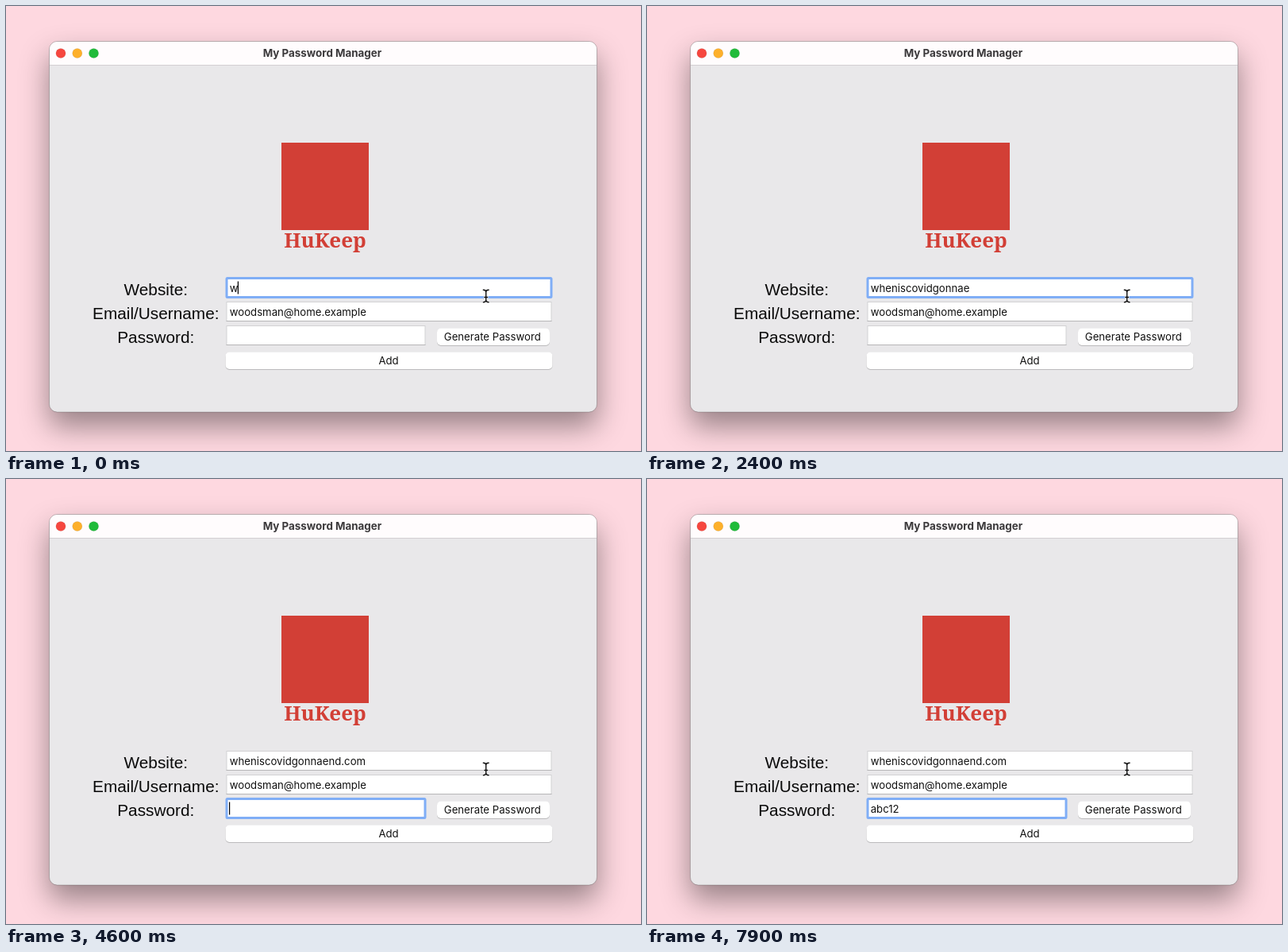
An HTML page for the animation above (8000 ms loop, 800 by 560 pixels).

```html
<!DOCTYPE html>
<html lang="en">
<head>
<meta charset="utf-8">
<title>My Password Manager</title>
<style>
  html, body { margin: 0; width: 100%; height: 100%; overflow: hidden; background: #fed8e0; }
  svg { display: block; width: 800px; height: 560px; }
  text { white-space: pre; }
  .ui { font: 13.2px Inter, sans-serif; fill: #111; }
  .label { font: 20.8px "Liberation Sans", Arial, sans-serif; fill: #0a0a0a; text-anchor: middle; }
  .title { font: 700 13.4px Inter, sans-serif; fill: #3b393b; text-anchor: middle; }
  .brand { font: 900 26px "Noto Serif", serif; fill: #d23f36; text-anchor: middle; }
  .mid { text-anchor: middle; }
</style>
</head>
<body>
<svg id="stage" viewBox="0 0 800 560" xmlns="http://www.w3.org/2000/svg">
  <defs>
    <filter id="shadow" filterUnits="userSpaceOnUse" x="-60" y="-60" width="920" height="700" color-interpolation-filters="sRGB">
      <feDropShadow dx="0" dy="18" stdDeviation="18" flood-color="#000" flood-opacity="0.4"/>
    </filter>
    <filter id="lift" x="-5%" y="-30%" width="110%" height="170%" color-interpolation-filters="sRGB">
      <feDropShadow dx="0" dy="0.7" stdDeviation="0.6" flood-color="#000" flood-opacity="0.28"/>
    </filter>
  </defs>

  <rect width="800" height="560" fill="#fed8e0"/>
  <rect x="54.5" y="44.5" width="690" height="466.5" rx="10" fill="#e9e8ea" stroke="#000" stroke-opacity="0.22" filter="url(#shadow)"/>
  <path d="M55 74V54.5a9.5 9.5 0 0 1 9.5 -9.5H734.5a9.5 9.5 0 0 1 9.5 9.5V74Z" fill="#fffcfd"/>
  <path d="M55 74.5H744" stroke="#d3d0d2"/>
  <g stroke-opacity="0.12" stroke="#000" stroke-width="0.6">
    <circle cx="69" cy="59.5" r="6.1" fill="#f6473f"/>
    <circle cx="89.8" cy="59.5" r="6.1" fill="#fdb02b"/>
    <circle cx="110.5" cy="59.5" r="6.1" fill="#20bb3a"/>
  </g>
  <text class="title" x="398.5" y="63.8">My Password Manager</text>

  <rect x="347" y="172" width="110" height="110" fill="#d23f36"/>
  <text class="brand" x="402" y="304">HuKeep</text>

  <text class="label" x="188.8" y="363.5">Website:</text>
  <text class="label" x="188.8" y="393.5">Email/Username:</text>
  <text class="label" x="188.8" y="423.5">Password:</text>

  <g id="fields"></g>

  <g fill="#fff" filter="url(#lift)">
    <rect x="543" y="405.5" width="142" height="21.5" rx="5"/>
  </g>
  <g fill="#fff" filter="url(#lift)">
    <rect x="276.5" y="435.5" width="412" height="21.5" rx="5"/>
  </g>
  <text class="ui mid" x="612.8" y="420.6">Generate Password</text>
  <text class="ui mid" x="482" y="450.6">Add</text>

  <g fill="none" stroke-linecap="round">
    <path id="beam" d="M601.3 357.3Q604.7 357.3 604.7 360V370Q604.7 372.7 601.3 372.7M608.1 357.3Q604.7 357.3 604.7 360M604.7 370Q604.7 372.7 608.1 372.7M602.8 366.5H606.6" stroke="#fff" stroke-opacity="0.8" stroke-width="2.8"/>
    <use href="#beam" id="pointer"/>
  </g>
</svg>
<script>
const LOOP = 8000;
const NS = "http://www.w3.org/2000/svg";
const SITE = "wheniscovidgonnaend.com";
const EMAIL = "woodsman@home.example";
const PASS = "abc12";
const TO_EMAIL = 3900, TO_PASS = 4500;

// Moment at which each character appears
const siteKeys = [0, 100, 200, 600, 600, 600, 800, 900, 1100, 1200, 1300, 1500,
  1700, 1900, 2100, 2200, 2300, 2500, 2600, 2800, 2900, 3000, 3200];
const passKeys = [6900, 7100, 7300, 7500, 7700];

function add(parent, tag, attrs) {
  const el = document.createElementNS(NS, tag);
  for (const key in attrs) el.setAttribute(key, attrs[key]);
  parent.appendChild(el);
  return el;
}

function show(el, on) {
  el.setAttribute("visibility", on ? "visible" : "hidden");
}

function makeField(y, width) {
  const g = add(document.getElementById("fields"), "g", {});
  const box = { x: 278, y, width, height: 24 };
  add(g, "rect", { ...box, fill: "#fff", stroke: "#d2d1d3" });
  add(g, "path", { d: `M277.5 ${y + 24}h${width + 1}`, stroke: "#b7b6b8" });
  const ring = add(g, "rect", { ...box, rx: 1, fill: "#fff", stroke: "#80aef6", "stroke-width": 3 });
  const mark = add(g, "rect", { x: 281, y: y + 3, width: 0, height: 18, fill: "#a9ccf9" });
  const text = add(g, "text", { class: "ui", x: 281.7, y: y + 17 });
  const caret = add(g, "rect", { y: y + 4, width: 1.2, height: 16, fill: "#000" });
  return function (value, focused, caretOn, selected) {
    if (text.textContent !== value) text.textContent = value;
    const length = value ? text.getComputedTextLength() : 0;
    show(ring, focused);
    show(mark, selected);
    show(caret, focused && caretOn);
    mark.setAttribute("width", length + 0.7);
    caret.setAttribute("x", 281 + length);
  };
}

const drawSite = makeField(342.5, 409);
const drawEmail = makeField(372.5, 409);
const drawPass = makeField(402.5, 250);

// The pointer reuses the outline path as a thin black stroke
const pointer = document.getElementById("pointer");
const beam = add(pointer.parentNode, "path", { d: document.getElementById("beam").getAttribute("d") });
beam.setAttribute("stroke", "#111");
beam.setAttribute("stroke-width", "1.4");
pointer.remove();

function typed(text, keys, t) {
  return text.slice(0, keys.filter(k => k <= t).length);
}

// Caret: 600 ms on, 300 ms off, counted from the focus change
function blink(t) {
  return t % 900 < 600;
}

function draw(t) {
  const inEmail = t >= TO_EMAIL && t < TO_PASS;
  drawSite(typed(SITE, siteKeys, t), t < TO_EMAIL, blink(t + 50), false);
  drawEmail(EMAIL, inEmail, blink(t - TO_EMAIL), inEmail);
  drawPass(typed(PASS, passKeys, t), t >= TO_PASS, blink(t - TO_PASS), false);
}

const start = performance.now();
function tick() {
  draw((performance.now() - start) % LOOP);
  requestAnimationFrame(tick);
}
tick();
</script>
</body>
</html>
```
